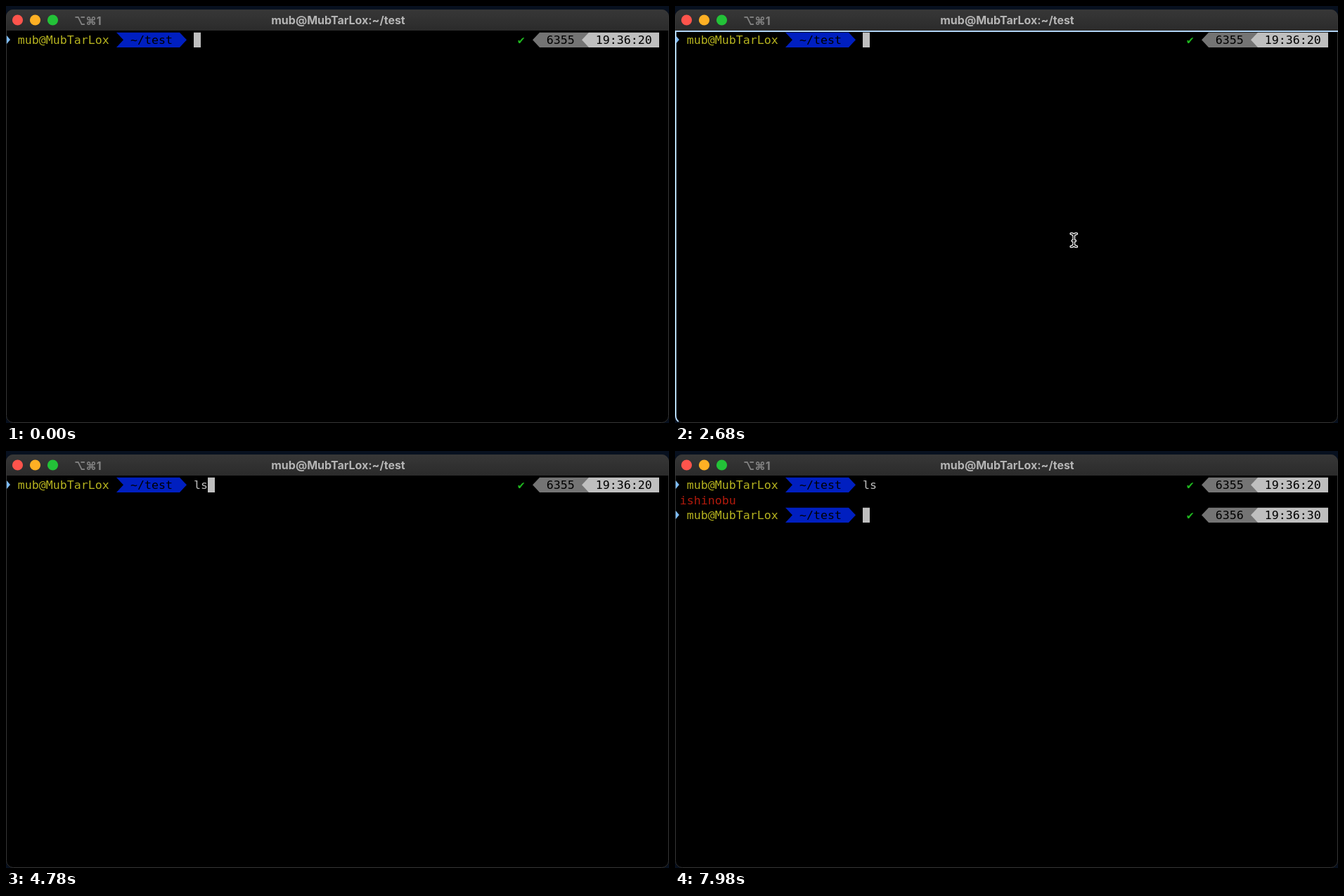
Recreate the animation shown at these times as an HTML page. Size 943x594 px, loop 8000 ms.

```html
<!DOCTYPE html>
<html lang="en">
<head>
<meta charset="utf-8">
<style>
  html, body { margin: 0; width: 100%; height: 100%; overflow: hidden; background: #07101f; }
  svg { display: block; }
  text { white-space: pre; }
  .mono { font: 16.63px "DejaVu Sans Mono", monospace; }
  .ui { font: 700 16px Inter, sans-serif; }
</style>
</head>
<body>
<svg width="943" height="594" viewBox="0 0 943 594">
  <defs>
    <linearGradient id="bar" x2="0" y2="1">
      <stop stop-color="#373737"/><stop offset="1" stop-color="#2b2b2b"/>
    </linearGradient>
    <clipPath id="win"><rect x="0" y="5" width="943" height="589" rx="10"/></clipPath>
    <path id="beam" d="M-4-9.2Q0-9.2 0-5.5Q0-9.2 4-9.2M0-5.5V5.5M-4 9.2Q0 9.2 0 5.5Q0 9.2 4 9.2M-2 1H2"/>
  </defs>
  <g clip-path="url(#win)">
    <rect width="943" height="594"/>
    <rect y="5" width="943" height="30" fill="url(#bar)"/>
    <g id="rows" class="mono"></g>
  </g>
  <rect x=".5" y="5.5" width="942" height="588" rx="10" fill="none" stroke="#363636"/>
  <path id="ring" d="M943 36H1V583Q1 589 5 592" fill="none" stroke="#b0d4f5" stroke-width="2"/>
  <circle cx="16.5" cy="20" r="7.6" fill="#fe544c"/>
  <circle cx="41.5" cy="20" r="7.6" fill="#feb024"/>
  <circle cx="66.5" cy="20" r="7.6" fill="#23c238"/>
  <text class="ui" x="97" y="26.5" fill="#828282">⌥⌘1</text>
  <text id="title" class="ui" x="472.5" y="25.5" fill="#b5b5b5" text-anchor="middle"></text>
  <g id="mouse" fill="none" stroke-linecap="round">
    <use href="#beam" stroke="#fff" stroke-width="3.8"/>
    <use href="#beam" stroke="#000" stroke-width="1.3"/>
  </g>
</svg>
<script>
const LOOP = 8000, ROW = 21.5, CELL = 10.012, LEFT = 6.8;
const HOST = 'mub@MubTarLox';
const $ = id => document.getElementById(id);

const label = (col, s, fill) =>
  `<text x="${LEFT + col * CELL}" y="16.5" fill="${fill}">${s}</text>`;
const shape = (d, fill) => `<path d="${d}" fill="${fill}"/>`;
const line = (n, body) => `<g transform="translate(0 ${37.5 + n * ROW})">${body}</g>`;

function prompt(n, typed, active, count, clock) {
  const caret = 267 + typed.length * 10;
  return line(n,
    shape('M1 4.5L6 10.5L1 16.5Z', '#7dbcf5') +
    label(1, HOST, '#b6b31f') +
    shape('M157 .3H247L257 10.7L247 21.5H157L167 10.7Z', '#001fc0') +
    label(17, '~/test', '#000') +
    label(26, typed, '#c0c0c0') +
    (active ? shape(`M${caret} .3h10V21.5h-10Z`, '#bfbfbf') : '') +
    label(72, '✔', '#1fb81f') +
    shape('M759 .3H829V21.5H759L749 10.7Z', '#747474') +
    shape('M829 .3H929V21.5H829L819 10.7Z', '#bfbfbf') +
    label(76.1, count, '#000') +
    label(83.1, clock, '#000'));
}

function screen(t) {
  const typed = t < 4600 ? '' : t < 4740 ? 'l' : 'ls';
  const done = t >= 7300;
  return prompt(0, typed, !done, '6355', '19:36:20') + (done
    ? line(1, label(0, 'ishinobu', '#b21a0c')) + prompt(2, '', true, '6356', '19:36:30')
    : '');
}

const show = (id, on) => $(id).setAttribute('visibility', on ? 'visible' : 'hidden');
let last = '';

function draw(now) {
  const t = now % LOOP;
  const html = screen(t);
  if (html !== last) $('rows').innerHTML = last = html;

  const p = Math.min(1, Math.max(0, (t - 1240) / 180));
  const glide = p * p * (3 - 2 * p);
  $('mouse').setAttribute('transform', `translate(${571.3 - 4 * glide} ${351 - 17.5 * glide})`);
  show('mouse', t >= 680 && t < 4600);
  show('ring', t >= 2600 && t < 4600);
}

$('title').textContent = HOST + ':~/test';
draw(0);
const start = performance.now();
requestAnimationFrame(function tick() {
  draw(performance.now() - start);
  requestAnimationFrame(tick);
});
</script>
</body>
</html>
```
